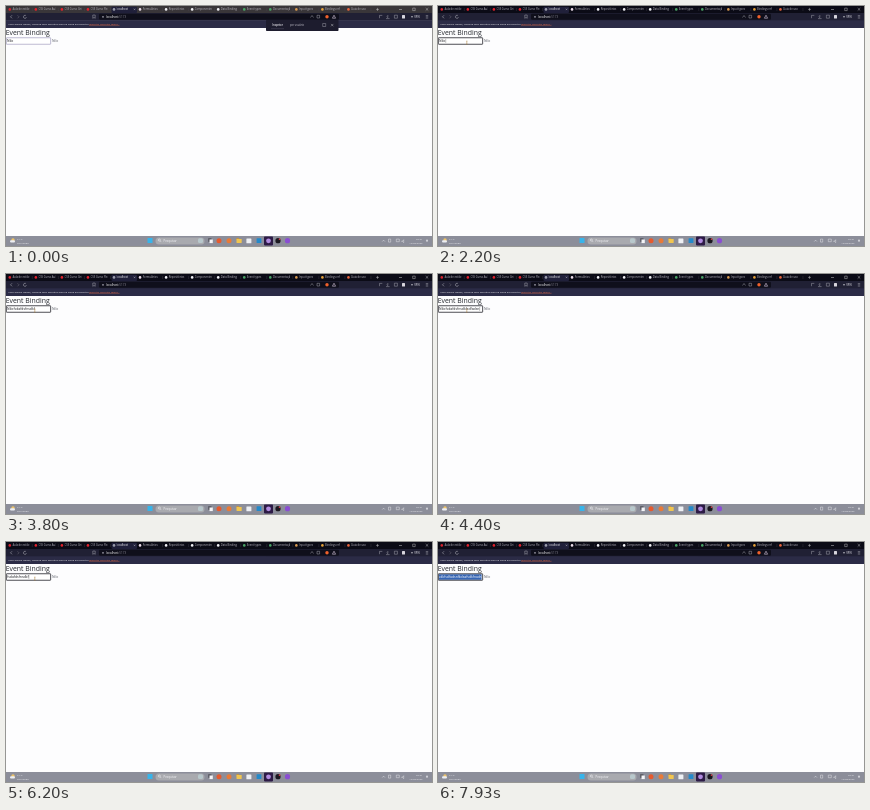
Animation of 426 by 240 pixels, one loop 8000 ms. Source, as an HTML page with a canvas:

```html
<!DOCTYPE html>
<html lang="pt">
<head>
<meta charset="utf-8">
<title>Event Binding</title>
<style>
html, body { margin: 0; width: 100%; height: 100%; overflow: hidden; background: #fdfdfe; }
canvas { display: block; width: 426px; height: 240px; }
</style>
</head>
<body>
<canvas id="stage"></canvas>
<script>
const W = 426, H = 240, LOOP = 8000;
const PANEL_END = 1730;
const canvas = document.getElementById('stage');
const scale = window.devicePixelRatio || 1;
canvas.width = W * scale;
canvas.height = H * scale;
const ctx = canvas.getContext('2d');
const FONT = '"Open Sans", "Noto Sans", sans-serif';
const NAME = 'Nilo';

function rect(x, y, w, h, color, radius = 0) {
  ctx.fillStyle = color;
  ctx.beginPath();
  ctx.roundRect(x, y, w, h, radius);
  ctx.fill();
}

function dot(x, y, r, color) {
  ctx.fillStyle = color;
  ctx.beginPath();
  ctx.arc(x, y, r, 0, Math.PI * 2);
  ctx.fill();
}

function line(points, color, width = 0.5) {
  ctx.strokeStyle = color;
  ctx.lineWidth = width;
  ctx.beginPath();
  points.forEach(([x, y], i) => i ? ctx.lineTo(x, y) : ctx.moveTo(x, y));
  ctx.stroke();
}

function box(x, y, w, h, color, width = 0.5, radius = 0) {
  ctx.strokeStyle = color;
  ctx.lineWidth = width;
  ctx.beginPath();
  ctx.roundRect(x, y, w, h, radius);
  ctx.stroke();
}

function text(str, x, y, size, color, weight = 400, align = 'left') {
  ctx.font = `${weight} ${size}px ${FONT}`;
  ctx.textAlign = align;
  ctx.fillStyle = color;
  ctx.fillText(str, x, y);
  return ctx.measureText(str).width;
}

function clipped(x, y, w, h, draw) {
  ctx.save();
  ctx.beginPath();
  ctx.rect(x, y, w, h);
  ctx.clip();
  draw();
  ctx.restore();
}

const tabs = [
  ['#d8232f', 'Aula de estilos'], ['#e0222c', 'CSS Curso Aula'],
  ['#e0222c', 'CSS Curso Grid'], ['#e0222c', 'CSS Curso Flex'],
  ['#9a9cab', 'localhost'], ['#eadbe8', 'Formulários'],
  ['#f0f0f4', 'Repositórios'], ['#f0f0f4', 'Componentes'],
  ['#f0f0f4', 'Data Binding'], ['#4aa366', 'Event types'],
  ['#4aa366', 'Documentação'], ['#d99a50', 'Input types'],
  ['#e5a139', 'Bindings ref'], ['#e8643c', 'Guia de uso']
];

// The strip is paler while the panel holds the focus.
function drawTabs(active) {
  rect(0, 0, W, 7, active ? '#0b0b16' : '#393639');
  tabs.forEach(([color, label], i) => {
    const x = 1.6 + i * 26.05;
    if (i === 4) rect(x - 0.3, 0.7, 25.5, 6.3, '#20203a', 1);
    dot(x + 2.2, 3.4, 1.3, color);
    clipped(x + 4.8, 0, 17, 7, () => text(label, x + 4.8, 4.4, 2.7, i === 4 ? '#ffffff' : '#b9b7c0'));
    if (i === 4) {
      line([[x + 22, 2.6], [x + 23.5, 4.1]], '#ddd', 0.35);
      line([[x + 23.5, 2.6], [x + 22, 4.1]], '#ddd', 0.35);
    } else {
      line([[x + 24.7, 2], [x + 24.7, 5]], '#4b4955', 0.35);
    }
  });
  line([[370, 3.4], [373, 3.4]], '#ddd', 0.4);
  line([[371.5, 1.9], [371.5, 4.9]], '#ddd', 0.4);
  line([[393, 3.5], [396, 3.5]], '#ddd', 0.45);
  box(406.7, 2.1, 2.5, 2.5, '#ddd', 0.4);
  line([[419.7, 2], [422.3, 4.6]], '#ddd', 0.4);
  line([[422.3, 2], [419.7, 4.6]], '#ddd', 0.4);
}

function drawToolbar() {
  const ink = '#c3c2cb';
  rect(0, 7, W, 7.6, '#202034');
  rect(93, 7.7, 240, 6, '#0f0f1b', 1.2);
  line([[6, 9.3], [4.5, 10.8], [6, 12.3]], ink);
  line([[11.5, 9.3], [13, 10.8], [11.5, 12.3]], '#74737e');
  ctx.beginPath();
  ctx.arc(19, 10.8, 1.5, 0.3, 5.4);
  ctx.strokeStyle = ink;
  ctx.stroke();
  line([[86.8, 9], [89.2, 9], [89.2, 12.4], [88, 11.3], [86.8, 12.4], [86.8, 9]], ink, 0.4);
  dot(97, 10.8, 0.9, '#9998a4');
  const w = text('localhost', 100, 11.9, 3, '#ffffff');
  text(':5173', 100 + w, 11.9, 3, '#85838f');
  line([[304.5, 11.5], [306, 9.5], [307.5, 11.5]], ink, 0.4);
  box(311, 9.3, 2.6, 2.7, ink, 0.4);
  dot(321, 10.8, 1.7, '#f0612b');
  line([[328, 9.2], [329.6, 12.2], [326.4, 12.2], [328, 9.2]], '#d5c7dc', 0.6);
  line([[373.5, 12.2], [373.5, 9.4], [376.3, 9.4]], ink, 0.4);
  line([[381.8, 9], [381.8, 11.6], [380.6, 10.5]], ink, 0.4);
  line([[380, 12.6], [383.6, 12.6]], ink, 0.4);
  box(388.4, 9.2, 3, 3, ink, 0.4);
  rect(396, 9, 3, 3.4, '#d7d5dd', 0.5);
  dot(406, 10.8, 0.8, ink);
  text('VPN', 408.2, 11.8, 2.7, ink, 600);
  [9.5, 10.8, 12.1].forEach(y => line([[419.8, y], [422.2, y]], ink, 0.4));
}

function drawBookmarks() {
  rect(0, 14.6, W, 7.5, '#2b2b46');
  text('Para acesso rápido, coloque seus favoritos aqui na barra de favoritos.', 2.5, 18.9, 2.5, '#ffffff', 500);
  const w = text('Importar favoritos agora...', 83, 18.9, 2.5, '#f0704a', 500);
  line([[83, 19.5], [83 + w, 19.5]], '#f0704a', 0.3);
}

function drawPanel() {
  rect(260, 14, 72.5, 11, '#1d1c2e', 0.8);
  text('Inspetor', 271.5, 20.2, 2.6, '#eeedf2', 600, 'center');
  text('por usuário', 291, 20.2, 2.6, '#c2c0ca', 400, 'center');
  line([[265, 22.7], [278, 22.7]], '#74728a', 0.3);
  box(316.7, 17.5, 3, 3, '#bcbac5', 0.4);
  line([[325, 17.9], [327.4, 20.3]], '#ddd', 0.4);
  line([[327.4, 17.9], [325, 20.3]], '#ddd', 0.4);
}

function drawTaskbar() {
  const ink = '#f6f6fa';
  rect(0, 230, W, 10, '#8c8e9a');
  dot(7, 233.9, 1.7, '#efc46a');
  rect(4, 234.3, 5, 2.2, '#eceef3', 1.1);
  text('21°C', 11, 234.2, 2.5, ink);
  text('Céu limpo', 11, 237.5, 2.5, ink);
  rect(141.5, 232, 5, 5, '#38b4ea', 0.3);
  rect(149.5, 231.4, 49, 7, '#a9aaaf', 3.5);
  box(152.3, 233, 2.1, 2.1, ink, 0.5, 1.05);
  line([[154.2, 234.9], [155.1, 235.9]], ink);
  text('Pesquisar', 157.5, 236, 2.9, ink);
  rect(192, 232.3, 5, 4.8, '#b8c8cc', 1.5);

  rect(202.2, 232.2, 3.3, 3.6, '#55565f');
  rect(203.5, 233.5, 3.3, 3.6, '#f4f4f7');
  dot(213, 234.7, 2.5, '#e65a2e');
  dot(223, 234.7, 2.5, '#e87a38');
  rect(230.5, 232.2, 2.5, 2, '#d99525', 0.4);
  rect(230.5, 233, 5.2, 4, '#f1c550', 0.4);
  rect(240.4, 232.5, 5, 4.8, '#eef0f4', 0.5);
  rect(250.6, 232.3, 4.8, 4.8, '#2489ca', 0.4);
  rect(258, 230.6, 9, 8.8, '#2d1b46', 0.8);
  dot(262.5, 234.8, 2.4, '#b18be0');
  dot(272, 234.7, 2.6, '#1b1820');
  dot(273.6, 233.2, 0.9, '#c53b48');
  dot(281.5, 234.7, 2.6, '#8a4ed2');

  line([[376.3, 235.5], [377.6, 234.2], [378.9, 235.5]], ink, 0.45);
  box(382.5, 233.1, 2.2, 3, ink, 0.4);
  box(390.3, 233.1, 3, 2.6, ink, 0.4);
  line([[395.3, 235.3], [396.3, 235.3], [397.7, 233.7], [397.7, 236.6], [396.3, 235.3]], ink, 0.4);
  text('20:41', 416.5, 234.1, 2.5, ink, 400, 'right');
  text('14/08/2023', 416.5, 237.5, 2.5, ink, 400, 'right');
  dot(421, 234.7, 1.1, '#d0d1d8');
}

function mash(count) {
  const keys = 'fsdafdsfnsdkfsdfadsnfkdsafsdkfnads';
  return keys.slice(0, Math.max(0, Math.min(keys.length, Math.floor(count))));
}

// The first entry extends the name; the second replaces it.
function inputState(t) {
  const second = t >= 5180;
  const value = second ? mash((t - 5180) / 78) : NAME + mash((t - 2750) / 80);
  const select = t >= 7400 ? Math.min(1, (t - 7400) / 280)
    : t >= 5060 && !second ? Math.min(1, (t - 5060) / 90) : 0;
  return { value, select, focused: t >= 1800 };
}

function drawPage(t) {
  rect(0, 22, W, 208, '#fdfdfe');
  text('Event Binding', -0.3, 29.2, 6.9, '#25282e', 500);
  const { value, select, focused } = inputState(t);
  rect(0.3, 31.7, 44.4, 6.5, '#ffffff');
  ctx.font = `400 3.4px ${FONT}`;
  const width = ctx.measureText(value).width;
  const x = Math.min(1.1, 43.6 - width);

  clipped(0.6, 31.8, 43.9, 6.3, () => {
    if (select) {
      const right = Math.min(44.5, x + width);
      const left = right - (right - 0.6) * select;
      rect(left, 32.2, right - left, 5.5, '#3565b5');
    }
    text(value, x, 36, 3.4, select ? '#ffffff' : '#16171c');
    if (focused && !select && t % 1000 < 530) {
      line([[x + width + 0.3, 32.9], [x + width + 0.3, 36.8]], '#222', 0.3);
    }
  });
  const border = focused ? '#22232a' : '#8780ac';
  box(0.35, 31.75, 44.3, 6.5, border, focused ? 0.8 : 0.55, 0.4);
  text(NAME, 46, 36, 3.4, '#5c6068');

  if (t >= 900 && t < 7400) {
    const cx = t < PANEL_END ? 29.7 : 28.8;
    line([[cx, 35], [cx, 38.3]], '#a77a35', 0.5);
    line([[cx - 0.7, 35], [cx + 0.7, 35]], '#a77a35', 0.35);
    line([[cx - 0.7, 38.3], [cx + 0.7, 38.3]], '#a77a35', 0.35);
  }
}

function render(now) {
  const t = now % LOOP;
  const panelOpen = t < PANEL_END;
  ctx.setTransform(scale, 0, 0, scale, 0, 0);
  drawPage(t);
  drawTabs(!panelOpen);
  drawToolbar();
  drawBookmarks();
  if (panelOpen) drawPanel();
  drawTaskbar();
}

const start = performance.now();
function tick() {
  render(performance.now() - start);
  requestAnimationFrame(tick);
}
tick();
</script>
</body>
</html>
```
